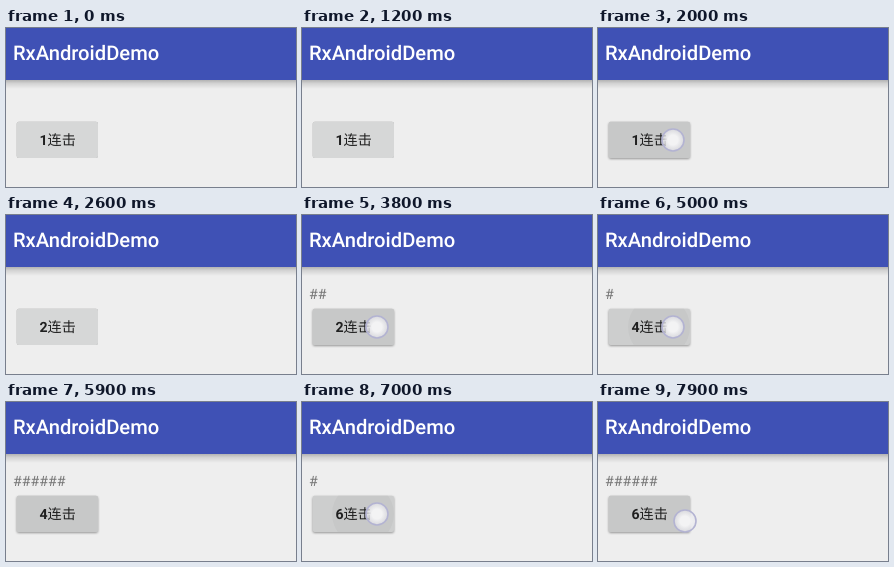
An HTML page that plays this animation: 290 px wide and 159 px high, repeating every 8 s.

```html
<!DOCTYPE html>
<html lang="zh-CN">
<head>
<meta charset="utf-8">
<title>RxAndroidDemo</title>
<style>
  html, body { margin: 0; width: 100%; height: 100%; overflow: hidden; background: #eee; }
  svg { display: block; width: 290px; height: 159px; }
  text {
    font-family: Roboto, "Noto Sans CJK SC", "Noto Sans CJK", sans-serif;
    text-rendering: geometricPrecision;
  }
  .title { font-size: 20.2px; font-weight: 500; fill: #fff; }
  .hashes { font-size: 14.2px; fill: #757575; }
  .label { font-size: 14.1px; font-weight: 700; fill: #202020; }
  .cjk { font-weight: 500; }
  .button { fill: #d6d7d7; filter: drop-shadow(0 .7px .6px rgba(0, 0, 0, .3)); }
  .button.pressed { fill: #cdcece; filter: drop-shadow(0 1px 1.2px rgba(0, 0, 0, .38)); }
</style>
</head>
<body>
<svg viewBox="0 0 290 159">
  <defs>
    <linearGradient id="shade" x1="0" y1="0" x2="0" y2="1">
      <stop offset="0" stop-color="#000" stop-opacity=".25"/>
      <stop offset=".4" stop-color="#000" stop-opacity=".11"/>
      <stop offset="1" stop-color="#000" stop-opacity="0"/>
    </linearGradient>
    <radialGradient id="glow">
      <stop offset=".45" stop-color="#f3f3f4"/>
      <stop offset="1" stop-color="#e6e6ec" stop-opacity=".6"/>
    </radialGradient>
    <clipPath id="inside"><rect x="10.7" y="93.8" width="81.3" height="36.2" rx="2"/></clipPath>
  </defs>
  <rect width="290" height="159" fill="#eee"/>
  <rect y="52" width="290" height="9" fill="url(#shade)"/>
  <rect width="290" height="52" fill="#3f51b5"/>
  <text class="title" x="7" y="31.5">RxAndroidDemo</text>
  <text class="hashes" id="hashes" x="7" y="84"></text>
  <rect class="button" id="button" x="10.7" y="93.8" width="81.3" height="36.2" rx="2"/>
  <g clip-path="url(#inside)"><circle id="ripple" cx="61" cy="112" fill="#c7c8c8"/></g>
  <text class="label" x="33.5" y="117"><tspan id="count">1</tspan><tspan class="cjk">连击</tspan></text>
  <circle id="finger" r="11" fill="url(#glow)" stroke="#b3b3d2" stroke-width="1.6"/>
</svg>
<script>
  const LOOP = 8000, STEP = 100, HOLD = 200;

  // Each burst: taps as [down, up], and the time its count is committed.
  const bursts = [
    { taps: [[800, 1000]], commit: 1200 },
    { taps: [[1800, 2100], [2200, 2400]], commit: 2600 },
    { taps: [[3200, 3400], [3500, 3600], [3700, 3900], [4000, 4100]], commit: 4300 },
    { taps: [[4800, 4900], [5000, 5100], [5200, 5300], [5400, 5500], [5600, 5700], [5800, 5900]], commit: 6200 },
    { taps: [[6800, 6900], [7000, 7100], [7200, 7300], [7400, 7500], [7500, 7600], [7600, 7700], [7800, LOOP]], commit: LOOP }
  ];
  const allTaps = bursts.flatMap(b => b.taps);
  const finalTap = allTaps[allTaps.length - 1];
  const el = id => document.getElementById(id);
  const [hashes, button, ripple, count, finger] =
    ['hashes', 'button', 'ripple', 'count', 'finger'].map(el);

  function draw(t) {
    const active = bursts.find(b => t >= b.taps[0][0] && t < b.commit);
    const done = bursts.filter(b => t >= b.commit).pop();
    const tap = allTaps.filter(([down]) => t >= down).pop();
    const touching = !!tap && t < tap[1];
    const pressed = !!tap && t < tap[1] + HOLD;

    hashes.textContent = '#'.repeat(active ? active.taps.filter(([, up]) => t >= up).length : 0);
    count.textContent = done ? done.taps.length : 1;
    button.classList.toggle('pressed', pressed);
    ripple.setAttribute('r', pressed ? 31 + (t - tap[0]) * 0.25 : 0);

    // The last touch lands lower right than the others.
    const [x, y] = tap === finalTap ? [87, 119] : [75, 112];
    finger.setAttribute('cx', x);
    finger.setAttribute('cy', y);
    finger.setAttribute('visibility', touching ? 'visible' : 'hidden');
  }

  const start = performance.now();
  function tick() {
    const t = (performance.now() - start) % LOOP;
    draw(Math.floor(t / STEP) * STEP);
    requestAnimationFrame(tick);
  }
  tick();
</script>
</body>
</html>
```
